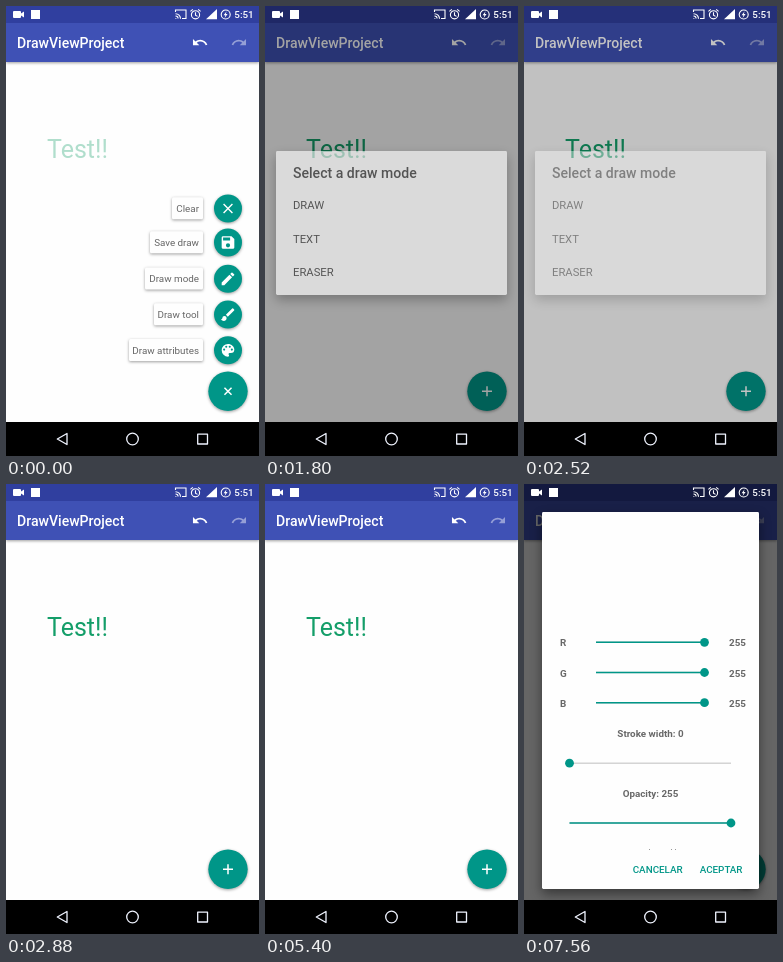
An HTML page that plays this animation: 253x450 px, repeating every 8 s.

```html
<!DOCTYPE html>
<html lang="en">
<head>
<meta charset="utf-8">
<title>Drawing app</title>
<style>
  html, body { margin: 0; width: 100%; height: 100%; overflow: hidden; background: #000; }
  svg { display: block; width: 100vw; height: 100vh; font-family: Roboto, sans-serif; }
  .title { font-size: 14.05px; font-weight: 500; }
  .small { font-size: 9.84px; }
  .strong { font-size: 9.84px; font-weight: 700; fill: #686868; }
  .option { font-size: 11.24px; fill: #212121; }
  .action { font-size: 9.84px; font-weight: 500; fill: #009688; }
  .raised { filter: drop-shadow(0 1.4px 1.4px rgba(0, 0, 0, .38)); }
  .mini.pressed { filter: drop-shadow(0 3px 4px rgba(0, 0, 0, .4)); }
  .mini.pressed.dark circle { fill: #00796b; }
  .panel { filter: drop-shadow(0 5px 6px rgba(0, 0, 0, .45)); }
</style>
</head>
<body>
<svg viewBox="0 0 253 450" preserveAspectRatio="none">
  <rect width="253" height="450" fill="#fefefe"/>

  <g class="raised">
    <rect y="17" width="253" height="39" fill="#3f51b5"/>
  </g>
  <rect width="253" height="17" fill="#303f9f"/>
  <text class="title" x="11" y="42" fill="#fff">DrawViewProject</text>
  <g id="history" fill="#fff"></g>

  <text id="ink" x="41" y="152.3" font-size="25" fill="#149e69">Test!!</text>

  <g id="menu"></g>
  <g class="raised"><circle cx="222" cy="385.3" r="19.7" fill="#009688"/></g>
  <path id="plus" d="M-5 0H5M0-5V5" stroke="#fff" stroke-width="1.5"/>

  <rect id="dim" width="253" height="416"/>

  <g id="modes">
    <rect class="panel" x="11" y="145" width="231" height="144" rx="1.4" fill="#fff"/>
    <text class="title" x="28" y="172" fill="#212121">Select a draw mode</text>
    <text class="option" x="28" y="203">DRAW</text>
    <text class="option" x="28" y="237">TEXT</text>
    <text class="option" x="28" y="270.4">ERASER</text>
  </g>

  <g id="attributes">
    <rect class="panel" x="18" y="28" width="217" height="377" rx="1.4" fill="#fefefe"/>
    <g id="sliders"></g>
    <g class="strong" text-anchor="middle">
      <text x="126.5" y="253">Stroke width: 0</text>
      <text x="126.5" y="313">Opacity: 255</text>
    </g>
    <path d="M125 365.5h1M147 365.5h1M151 365.5h1" stroke="#999"/>
    <text class="action" x="108.7" y="389">CANCELAR</text>
    <text class="action" x="175.7" y="389">ACEPTAR</text>
  </g>

  <!-- status bar -->
  <g fill="#fff">
    <path d="M8 5h6q1 0 1 1v1.5l3-2v6l-3-2V11q0 1-1 1H8q-1 0-1-1V6q0-1 1-1z"/>
    <rect x="25" y="4" width="9" height="9"/>
    <path d="M200 13.3 211 3v10.3z"/>
    <text x="228.3" y="12.2" class="small" font-weight="500">5:51</text>
    <g fill="none" stroke="#fff" stroke-width="1.1">
      <path d="M169.5 6V4h10.5v8.5h-4M169.5 12.5h.8M169.5 10a2.6 2.6 0 0 1 2.6 2.6M169.5 7.7a5 5 0 0 1 5 5"/>
      <circle cx="189.5" cy="8.8" r="4.1"/>
      <path d="M189.5 6.2v3l2 1.2M184.4 5.3l2.4-2M194.6 5.3l-2.4-2"/>
      <circle cx="219.7" cy="8.5" r="4.5"/>
    </g>
    <path d="M220.6 5.2 217.6 9.2h1.8l-.8 2.8 3-4h-1.8z"/>
  </g>

  <!-- navigation bar -->
  <rect y="416" width="253" height="34"/>
  <g fill="none" stroke="#f0f4ff" stroke-width="1.3" stroke-linejoin="round">
    <path d="M61 427.5v11L51.3 433z"/>
    <circle cx="126.5" cy="433" r="5.8"/>
    <rect x="191.7" y="428.2" width="9.8" height="9.8"/>
  </g>
</svg>

<script>
const $ = id => document.getElementById(id);
const DP = 253 / 360;

const dot = (x, y) => `M${x - 1.5} ${y}a1.5 1.5 0 1 0 3 0a1.5 1.5 0 1 0-3 0z`;
const ICONS = {
  undo: 'M12.5 8c-2.65 0-5.05 1-6.9 2.6L2 7v9h9l-3.62-3.62c1.39-1.16 3.16-1.88 5.12-1.88 3.54 0 6.55 2.31 7.6 5.5l2.37-.78C21.08 11.03 17.15 8 12.5 8z',
  clear: 'M19 6.4 17.6 5 12 10.6 6.4 5 5 6.4 10.6 12 5 17.6 6.4 19 12 13.4 17.6 19 19 17.6 13.4 12z',
  save: 'M17 3H5a2 2 0 0 0-2 2v14a2 2 0 0 0 2 2h14a2 2 0 0 0 2-2V7zM12 19a3 3 0 1 1 0-6a3 3 0 0 1 0 6zM15 9H5V5h10z',
  pencil: 'M3 17.25V21h3.75L17.8 9.94 14.06 6.2zM20.7 7.04a1 1 0 0 0 0-1.41l-2.34-2.34a1 1 0 0 0-1.41 0l-1.83 1.83 3.75 3.75z',
  brush: 'M7 14a3 3 0 0 0-3 3c0 1.3-1.16 2-2 2 .92 1.22 2.5 2 4 2a4 4 0 0 0 4-4 3 3 0 0 0-3-3zM20.7 4.63l-1.34-1.34a1 1 0 0 0-1.41 0L9 12.25 11.75 15l8.95-8.96a1 1 0 0 0 0-1.41z',
  palette: 'M12 3a9 9 0 0 0 0 18 1.5 1.5 0 0 0 1.1-2.5 1.5 1.5 0 0 1 1.1-2.5H16a5 5 0 0 0 5-5c0-4.42-4.03-8-9-8z'
    + dot(6.5, 11) + dot(9.5, 7) + dot(14.5, 7) + dot(17.5, 11)
};

const icon = (name, x, y, flip = 1, opacity = 1) =>
  `<path d="${ICONS[name]}" fill="#fff" fill-rule="evenodd" opacity="${opacity}"
    transform="translate(${x} ${y}) scale(${flip * DP} ${DP}) translate(-12 -12)"/>`;

$('history').innerHTML = icon('undo', 194, 36.5) + icon('undo', 233, 36.5, -1, .45);

// label, icon, centre y, left edge of the label card
const ITEMS = [
  ['Clear', 'clear', 202.5, 166],
  ['Save draw', 'save', 236.5, 144],
  ['Draw mode', 'pencil', 272.8, 139],
  ['Draw tool', 'brush', 308.6, 148],
  ['Draw attributes', 'palette', 344.3, 123]
];
$('menu').innerHTML = ITEMS.map(([label, name, y, left]) => `<g>
  <rect class="raised" x="${left}" y="${y - 11.3}" width="${197 - left}" height="22" rx="1.5" fill="#fefefe"/>
  <text class="small" x="193" y="${y + 3.2}" text-anchor="end" fill="#666">${label}</text>
  <g class="mini raised"><circle cx="222" cy="${y}" r="14" fill="#009688"/></g>
  ${icon(name, 222, y)}</g>`).join('');
const items = [...$('menu').children];
const minis = items.map(item => item.querySelector('.mini'));
minis[4].classList.add('dark');

const slider = (y, from, to, value) => `
  <path d="M${from} ${y}H${to}" stroke="#d4d4d4" stroke-width="1.4"/>
  <path d="M${from} ${y}H${value}" stroke="#009688" stroke-width="1.5"/>
  <circle cx="${value}" cy="${y}" r="4.4" fill="#009688"/>`;
$('sliders').innerHTML = [...'RGB'].map((channel, i) => {
  const y = 158.3 + 30.2 * i;
  return `<g class="strong"><text x="36" y="${y + 4}">${channel}</text>
    <text x="205" y="${y + 4}">255</text></g>` + slider(y, 72, 180.5, 180.5);
}).join('') + slider(279.2, 45.5, 207, 45.5) + slider(339, 45.5, 207, 207);

const CLOSED = { shown: 0, angle: 0, pressed: -1, dialog: '', fade: 0, ink: 1 };
const OPEN = { ...CLOSED, shown: 5, angle: 45 };
const STEPS = [
  [0, { ...OPEN, ink: .33 }],
  [360, OPEN],
  [1440, { ...OPEN, angle: 0, pressed: 2 }],
  [1800, { ...CLOSED, dialog: 'modes', fade: .6 }],
  [2160, { ...CLOSED, dialog: 'modes', fade: 1 }],
  [2520, { ...CLOSED, dialog: 'modes', fade: .4 }],
  [2880, CLOSED],
  [6120, { ...CLOSED, shown: 3, angle: 25 }],
  [6480, OPEN],
  [6840, { ...OPEN, angle: 0, pressed: 4 }],
  [7200, { ...CLOSED, dialog: 'attributes', fade: .6 }],
  [7560, { ...CLOSED, dialog: 'attributes', fade: 1 }]
];
const LOOP = 8000;

function render(time) {
  const state = STEPS.filter(([start]) => start <= time).pop()[1];
  $('ink').setAttribute('opacity', state.ink);
  $('plus').setAttribute('transform', `translate(222 385.3) rotate(${state.angle})`);
  // the menu unfolds from the bottom
  items.forEach((item, i) => {
    item.style.display = i >= ITEMS.length - state.shown ? '' : 'none';
    minis[i].classList.toggle('pressed', i === state.pressed);
  });
  $('dim').setAttribute('opacity', .6 * state.fade);
  for (const id of ['modes', 'attributes']) {
    $(id).setAttribute('opacity', id === state.dialog ? state.fade : 0);
  }
}

const begin = performance.now();
function tick() {
  render((performance.now() - begin) % LOOP);
  requestAnimationFrame(tick);
}
tick();
</script>
</body>
</html>
```
